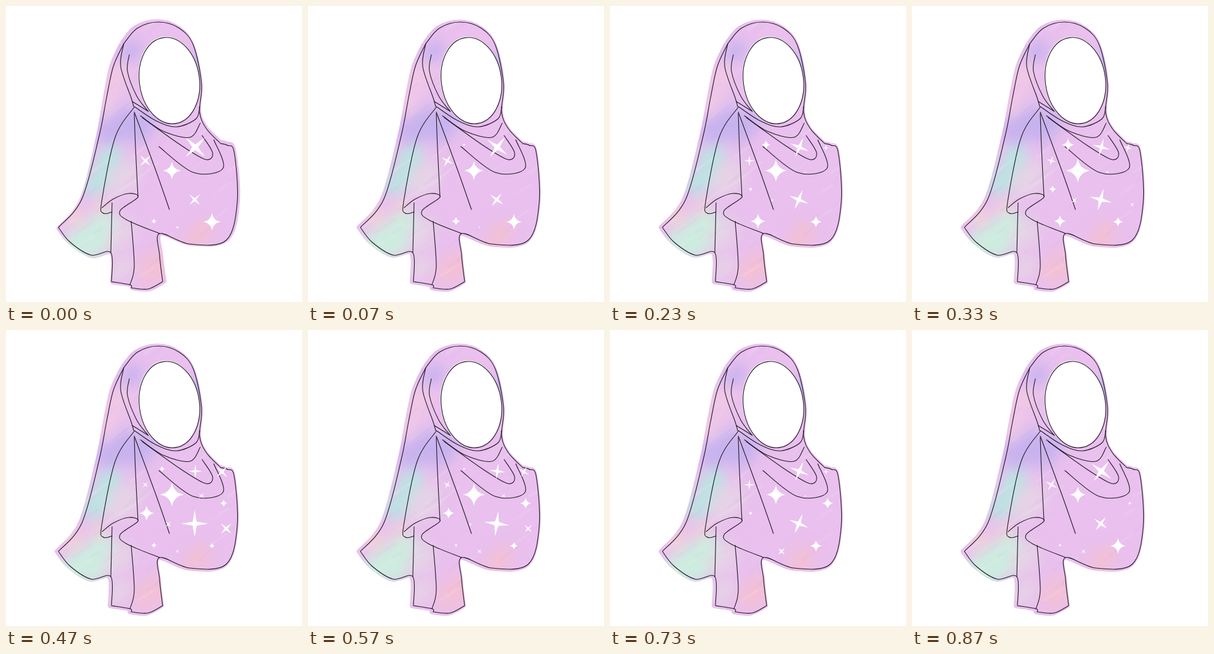
An HTML page for the animation above (0.96 s loop, 480x480 px).

```html
<!DOCTYPE html>
<html lang="en">
<head>
<meta charset="utf-8">
<title>Pastel hijab with twinkling stars</title>
<style>
html, body { margin: 0; width: 100%; height: 100%; overflow: hidden; background: #fff; }
svg { display: block; width: 100vw; height: 100vh; }
#lines { fill: none; stroke: #1d181f; stroke-width: 1.1; stroke-linecap: round; stroke-linejoin: round; }
</style>
</head>
<body>
<svg viewBox="0 0 480 480">
  <defs>
    <filter id="soft" x="-20%" y="-20%" width="140%" height="140%"><feGaussianBlur stdDeviation="10"/></filter>
    <filter id="brush"><feGaussianBlur stdDeviation="1"/></filter>
    <mask id="cloth" maskUnits="userSpaceOnUse" x="0" y="0" width="480" height="480">
      <path id="shape" fill="#fff" stroke="#fff" stroke-width="8" stroke-linejoin="round" transform="translate(-2 0)"/>
    </mask>
  </defs>
  <g id="paint">
    <g mask="url(#cloth)">
      <rect width="480" height="480" fill="#e9c0ee"/>
      <g id="blobs" filter="url(#soft)"></g>
      <g id="strokes" filter="url(#brush)" stroke-linecap="round"></g>
    </g>
  </g>
  <ellipse cx="264.5" cy="119.5" rx="49" ry="70.5" fill="#fff" transform="rotate(-8 265 121)"/>
  <g id="lines">
    <ellipse cx="265" cy="121" rx="48.7" ry="70.3" transform="rotate(-8 265 121)"/>
  </g>
  <g id="stars" fill="#fff"></g>
</svg>
<script>
const $ = id => document.getElementById(id);

function add(parent, tag, attrs) {
  const el = document.createElementNS('http://www.w3.org/2000/svg', tag);
  for (const key in attrs) el.setAttribute(key, attrs[key]);
  return parent.appendChild(el);
}

// Smooth curve through "x,y x,y ..."; "|" marks a corner.
function curve(text) {
  let d = '', last = null;
  for (const part of text.split('|')) {
    const pts = part.trim().split(/\s+/).map(p => p.split(',').map(Number));
    if (last) pts.unshift(last);
    else d = 'M' + pts[0];
    for (let i = 0; i < pts.length - 1; i++) {
      const b = pts[i], c = pts[i + 1], a = pts[i - 1] || b, e = pts[i + 2] || c;
      const c1 = b.map((v, j) => v + (c[j] - a[j]) / 6);
      const c2 = c.map((v, j) => v - (e[j] - b[j]) / 6);
      d += `C${c1} ${c2} ${c}`;
    }
    last = pts[pts.length - 1];
  }
  return d;
}

const hood = '191,61 213,36 247,26 281,36 304,64 317,126 314,172';
const shoulder = '325,199 348,223 | 359,226 370,237 375,318 357,380 298,386 249,369';
const tail = '249,404 254,447 | 230,459 203,457 | 201,452 171,447 | 170,400';
const back = '138,404 104,383 85,359 | 123,313 151,211 163,149 174,98 191,61';
const body = [hood, shoulder, tail, back].join(' ');

const folds = [
  '191,61 186,98 203,149 207,163',
  '200,79 197,106 212,146 230,170',
  '205,155 231,171',
  '208,163 243,186 276,196 308,183 314,163',
  '208,164 177,213 155,318 158,336 172,334',
  '156,327 174,313 199,304 214,310 185,332 196,347 249,369',
  '208,174 210,230 214,309',
  '208,172 243,267 265,330',
  '218,178 255,203 298,213 315,190',
  '221,181 284,226 324,249 335,238 318,210',
  '248,228 304,270 352,263 337,217',
  '172,319 170,400',
  '203,349 208,422 201,452'
];

// Washes of colour: x, y, radius
const washes = {
  '#c8b2ee': [[203, 75, 17], [312, 95, 20], [178, 192, 30], [218, 196, 24]],
  '#f0c8e6': [[180, 115, 22], [165, 160, 18]],
  '#b9e4e2': [[165, 248, 20], [146, 285, 20]],
  '#cdebe0': [[145, 372, 34], [110, 385, 24]],
  '#f2d3d4': [[110, 342, 13], [150, 325, 11]],
  '#e6d2e6': [[190, 280, 26], [184, 370, 22], [183, 425, 18]],
  '#f3c0d4': [[310, 372, 20], [235, 425, 24]]
};

for (const fill in washes) {
  for (const [x, y, r] of washes[fill]) {
    add($('blobs'), 'ellipse', { rx: r * 1.3, ry: r * 0.85, fill, transform: `translate(${x} ${y}) rotate(-50)` });
  }
}

$('shape').setAttribute('d', curve(body));
for (const line of [body, ...folds]) add($('lines'), 'path', { d: curve(line) });

let seed = 11;
const random = () => (seed = seed * 16807 % 2147483647) / 2147483647;
for (let i = 0; i < 120; i++) {
  const x = 80 + random() * 290, y = 25 + random() * 430, length = 10 + random() * 25;
  add($('strokes'), 'path', {
    d: `M${x} ${y}l${length} ${-length * (0.6 + random() * 0.3)}`,
    stroke: random() < 0.6 ? '#fff' : '#d0a4e4',
    'stroke-width': 1 + random() * 3,
    opacity: 0.05 + random() * 0.1
  });
}

// x, y, smallest, largest (below zero: hidden), step of largest
const diamonds = [
  [269, 267, 13, 21, 5], [334, 350, 5, 14, 0], [240, 349, -2, 12, 3],
  [253, 225, -5, 10, 4], [228, 297, -5, 12, 6], [353, 281, -6, 12, 8]
];
// the same, then half turns per loop (0: stays a cross)
const sparks = [
  [307, 229, 11, 22, 0, 1], [226, 251, 6, 12, 0, 2], [306, 314, 12, 22, 6, 1],
  [350, 230, -1, 12, 6, 2], [278, 359, -1, 8, 9, 0], [317, 269, -2, 6, 6, 0],
  [263, 315, -7, 9, 5, 0], [357, 322, -10, 12, 6, 0]
];

const star = bend => {
  const b = bend;
  return `M0-1Q${b} ${-b} 1 0Q${b} ${b} 0 1Q${-b} ${b}-1 0Q${-b} ${-b} 0-1Z`;
};
const makeStars = (list, d) => list.map(data => ({ data, el: add($('stars'), 'path', { d }) }));
const twinkles = [
  ...makeStars(diamonds, star(0.14)),
  ...makeStars(sparks, 'M0-1L.15-.15 1 0 .15.15 0 1-.15.15-1 0-.15-.15Z')
];

const starts = [0, 70, 170, 230, 330, 400, 470, 570, 630, 730, 800, 870];
const count = starts.length;

// Triangle wave over the loop: 1 at step 0, 0 half a loop later.
const wave = step => Math.abs(1 - 2 * (((step / count) % 1 + 1) % 1));

function pose(step) {
  $('paint').setAttribute('transform', step % 8 ? '' : 'rotate(-0.8 200 150)');
  for (const { data: [x, y, low, high, peak, turns], el } of twinkles) {
    const size = Math.max(0, low + (high - low) * wave(step - peak));
    const angle = turns === undefined ? 0 : 45 * wave(step * turns);
    el.setAttribute('transform', `translate(${x} ${y}) rotate(${angle}) scale(${size})`);
  }
}

let shown = -1;
function draw() {
  const time = performance.now() % 960;
  const step = starts.filter(start => start <= time).length - 1;
  if (step !== shown) pose(shown = step);
  requestAnimationFrame(draw);
}
draw();
</script>
</body>
</html>
```
